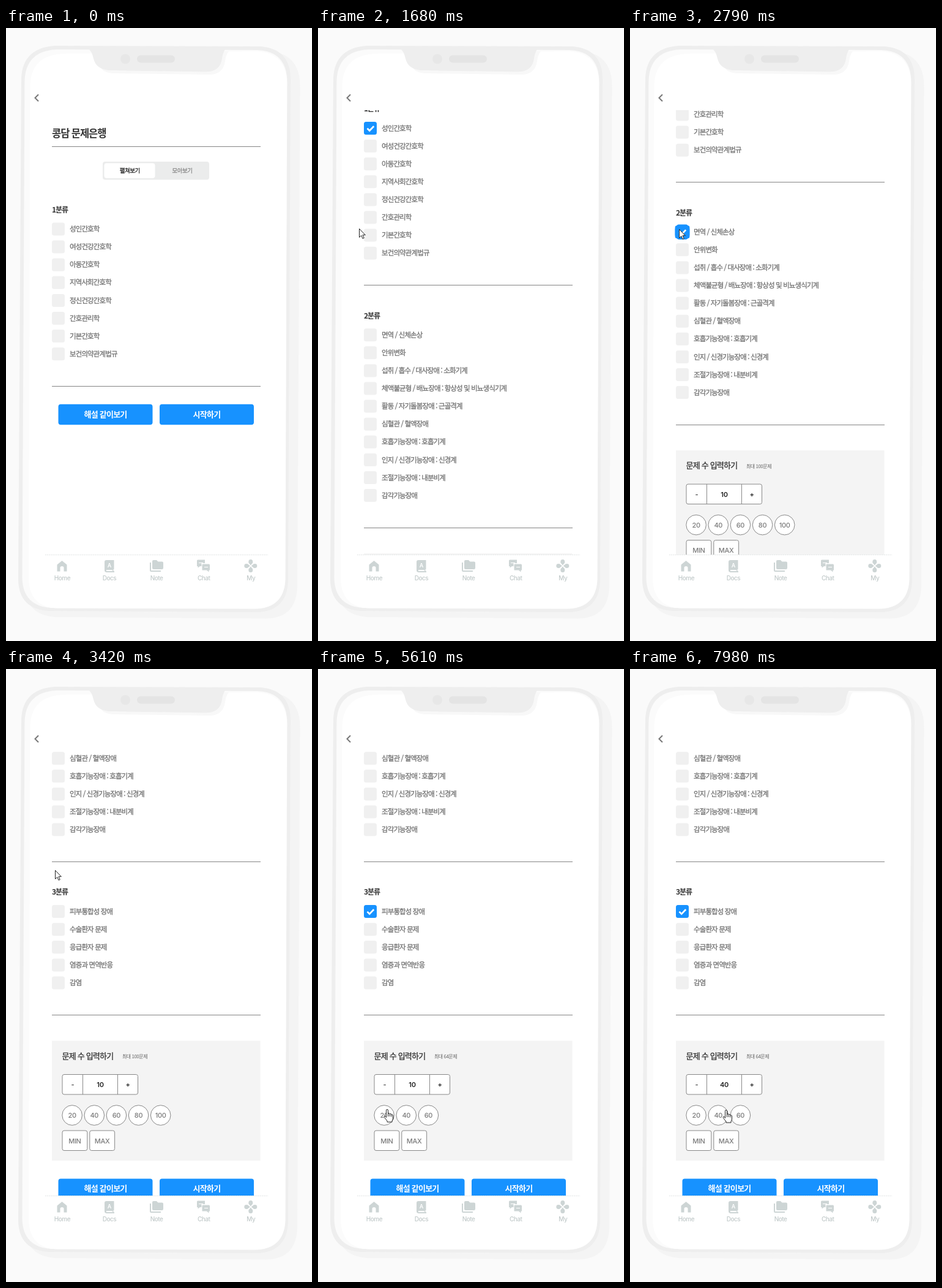
An HTML page for the animation above (8 s loop, 500 px wide and 1000 px high).

```html
<!DOCTYPE html>
<html lang="ko">
<head>
<meta charset="utf-8">
<style>
html, body { margin: 0; width: 100%; height: 100%; overflow: hidden; background: #fafafa; }
svg { display: block; width: 100vw; height: 100vh; }
text { font-family: "Noto Sans CJK KR", "Noto Sans CJK", "Noto Sans KR", sans-serif; }
.num { font-family: Inter, "Noto Sans CJK KR", sans-serif; }
</style>
</head>
<body>
<svg id="stage" viewBox="0 0 500 1000" xmlns="http://www.w3.org/2000/svg">
  <defs><clipPath id="view"><rect x="38" y="134" width="420" height="725"/></clipPath></defs>
  <rect width="500" height="1000" fill="#fafafa"/>
  <path fill="#f4f4f4" d="M90 37H425Q481 40 480.500 96L476 912Q474 963 424 963.500L84 961Q36 960 30 915L40 90Z"/>
  <path fill="#eee" d="M79 29L414 30Q465 33 465 84L461 902Q459 952 409 953L70 951Q21 948 20 900L25 82Q27 33 79 29Z"/>
  <path fill="#fbfbfb" d="M82 35L411 36Q459 38 459.500 88L456 900Q454 946 406 947L74 946Q28 943 26.500 898L30.500 86Q32 38 82 35Z"/>
  <path fill="#fff" d="M90 42L409 38Q458 40 459 90L456.500 900Q454 947 406 947.500L82 946.500Q38 944 37 898L39.500 92Q42 46 90 42Z"/>
  <path fill="#f8f8f8" d="M150 38H364Q359 44 358 54Q355 76 332 76L174 74Q154 72 150 56Z"/>
  <path fill="#eee" d="M136 35H358Q354 41 353 50Q350 71 327 71.500L168 69Q147 67 143 50Q141 40 136 35Z"/>
  <circle cx="195" cy="50.500" r="8" fill="#e7e7e7"/>
  <rect x="214" y="44.500" width="62" height="12" rx="6" fill="#e4e4e4"/>
  <path d="M53 108.500L47.500 114L53 119.500" fill="none" stroke="#777" stroke-width="2"/>
  <g clip-path="url(#view)"><g id="page"></g></g>
  <path d="M64 859.500H428" stroke="#e2e5e5" stroke-dasharray="2 1"/>
  <g id="nav" fill="#cdd5d5"></g>
  <g id="arrow" fill="#fff" stroke="#222" stroke-width="1" stroke-linejoin="round">
    <path d="M.5.5V14.500L3.800 11.500L6 16.500L8.200 15.500L6 10.700H10.300Z"/>
  </g>
  <g id="hand" fill="#fff" stroke="#222" stroke-width="1" stroke-linejoin="round">
    <path d="M-1.500 12.500V1.200Q-1.500-.5 0-.5Q1.500-.5 1.500 1.200V7Q1.800 5.500 3 5.700Q4.300 5.800 4.300 7.500Q4.800 6.200 6 6.500Q7 6.800 7 8.500Q7.800 7.300 8.800 8Q9.500 8.500 9.500 10V14Q9.500 16 8 18V20H0V18.200L-4.500 12.500Q-5.500 10.800-4.200 10.200Q-3 9.800-1.500 12.500ZM1.500 7V11M4.300 7.500V11M7 8.500V11.500"/>
  </g>
</svg>
<script>
const LOOP = 8000, BLUE = '#1792ff', STEP = 29.1, TICK = 166.25;
const $ = id => document.getElementById(id);
const page = $('page');

function el(parent, tag, attrs, text) {
  const n = document.createElementNS('http://www.w3.org/2000/svg', tag);
  for (const k in attrs) n.setAttribute(k, attrs[k]);
  if (text !== undefined) n.textContent = text;
  parent.appendChild(n);
  return n;
}
const rect = (p, x, y, width, height, rx, fill, stroke = 'none') =>
  el(p, 'rect', { x, y, width, height, rx, fill, stroke });
// y is the middle of the line of text
const label = (p, x, y, text, size, fill, more = {}) =>
  el(p, 'text', { x, y: y + size * 0.365, 'font-size': size, fill, ...more }, text);
const number = (p, x, y, text, fill, weight = 500) =>
  label(p, x, y, text, 11, fill, { class: 'num', 'text-anchor': 'middle', 'font-weight': weight, 'letter-spacing': -0.3 });
const rule = (p, y) => el(p, 'path', { d: `M75 ${y}H415.500`, stroke: '#858585', 'shape-rendering': 'crispEdges' });
// a hairline outline gives regular type a medium weight
const medium = color => ({ stroke: color, 'stroke-width': 0.3 });
const show = (n, on) => n.setAttribute('display', on ? 'inline' : 'none');
const move = (n, x, y) => n.setAttribute('transform', `translate(${x} ${y})`);
const clamp = x => Math.max(0, Math.min(1, x));
const easeOut = x => 1 - (1 - clamp(x)) ** 2.3;
const smooth = x => x * x * (3 - 2 * x);

// Header
label(page, 75, 172, '콩담 문제은행', 16.5, '#333', { 'font-weight': 700, 'letter-spacing': -1.05 });
rule(page, 193.5);
rect(page, 158, 218, 174, 29.5, 4, '#ebecec');
rect(page, 160.5, 220.5, 83, 24.5, 4, '#fff');
const tab = { 'text-anchor': 'middle', 'letter-spacing': -0.45 };
label(page, 202.3, 233, '펼쳐보기', 9.5, '#222', { ...tab, ...medium('#222') });
label(page, 288, 233, '모아보기', 9.5, '#888', { ...tab, ...medium('#888') });

// Groups of check boxes; only the first box of each gets ticked
function group(top, name, items, clickAt) {
  const g = el(page, 'g', {});
  label(g, 75, top, name, 12, '#333', { 'font-weight': 700, 'letter-spacing': -1 });
  const cy = top + 31.5;
  items.forEach((s, i) => {
    const y = cy + i * STEP;
    rect(g, 75, y - 10.5, 21, 21, 3.5, '#f0f0f0');
    label(g, 104, y, s, 11.5, '#757575', { ...medium('#757575'), 'letter-spacing': -0.88 });
  });
  const end = cy + (items.length - 1) * STEP + 52.5;
  rule(g, end);
  const tick = el(g, 'g', {});
  const dots = [[0, -18], [16, -8], [16, 8], [0, 18], [-16, 8], [-16, -8]]
    .map(dir => ({ dir, node: rect(tick, 0, 0, 21, 21, 4, BLUE) }));
  rect(tick, 75, cy - 10.5, 21, 21, 3.5, BLUE);
  el(tick, 'path', { d: `M80.500 ${cy + 0.3}l3.700 3.700 7-7.300`, fill: 'none', stroke: '#fff', 'stroke-width': 2.7 });
  return { g, end, cy, tick, dots, clickAt };
}
const g1 = group(296.5, '1분류',
  ['성인간호학', '여성건강간호학', '아동간호학', '지역사회간호학', '정신건강간호학', '간호관리학', '기본간호학', '보건의약관계법규'], 770);
const g2 = group(g1.end + 49.5, '2분류',
  ['면역 / 신체손상', '안위변화', '섭취 / 흡수 / 대사장애 : 소화기계', '체액불균형 / 배뇨장애 : 항상성 및 비뇨생식기계',
   '활동 / 자기돌봄장애 : 근골격계', '심혈관 / 혈액장애', '호흡기능장애 : 호흡기계', '인지 / 신경기능장애 : 신경계',
   '조절기능장애 : 내분비계', '감각기능장애'], 2772);
const g3 = group(g2.end + 49.5, '3분류',
  ['피부통합성 장애', '수술환자 문제', '응급환자 문제', '염증과 면역반응', '감염'], 4200);
const groups = [g1, g2, g3];

// Question count panel
const panel = el(page, 'g', {});
rect(panel, 75, 0, 340.5, 195.5, 0, '#f4f4f4');
label(panel, 91.5, 24.5, '문제 수 입력하기', 13, '#333', { ...medium('#333'), 'letter-spacing': -0.8 });
const limit = label(panel, 190, 26, '', 8, '#666', { 'letter-spacing': -0.5 });
rect(panel, 92, 55, 123.5, 32.5, 3, '#fff', '#888');
el(panel, 'path', { d: 'M125.500 55V87.500M182.500 55V87.500', stroke: '#888' });
number(panel, 109, 71.5, '-', '#333');
number(panel, 199, 71.5, '+', '#222', 600);
const count = number(panel, 154, 71.5, '', '#222', 600);
const chips = [20, 40, 60, 80, 100].map((v, i) => {
  const g = el(panel, 'g', {}), cx = 108.1 + i * 36.15;
  el(g, 'circle', { cx, cy: 121.5, r: 16.3, fill: '#fff', stroke: '#888' });
  number(g, cx, 121.5, v, '#7a7a7a');
  return { g, cx };
});
[['MIN', 92], ['MAX', 136.8]].forEach(([s, x]) => {
  rect(panel, x, 146.5, 40.8, 32.5, 3, '#fff', '#888');
  number(panel, x + 20.4, 163, s, '#7a7a7a');
});

// Action buttons
const actions = el(page, 'g', {});
[['해설 같이보기', 85.5], ['시작하기', 251]].forEach(([s, x]) => {
  rect(actions, x, 0, 154, 33.5, 4, BLUE);
  label(actions, x + 77, 16.2, s, 13, '#fff', { 'font-weight': 700, 'text-anchor': 'middle', 'letter-spacing': -0.75 });
});

// Bottom bar
const nav = $('nav');
['Home', 'Docs', 'Note', 'Chat', 'My'].forEach((s, i) =>
  label(nav, 91.9 + i * 77.1, 897.5, s, 10, '#c2caca', { class: 'num', 'text-anchor': 'middle', 'font-weight': 500, 'letter-spacing': -0.5 }));
const icon = (d, fill = '#cdd5d5') => el(nav, 'path', { d, fill });
icon('M91.500 869L99.500 875.500V886.500H94.500V880.500Q94.500 878 91.500 878T88.500 880.500V886.500H83.500V875.500Z');
icon('M164 868H176.500V883H175.500V886H177V888H164Q161 887.500 161 884.500V871Q161 868 164 868ZM164 884V886H174V884Z');
number(nav, 168.800, 876, 'A', '#fff', 600).setAttribute('font-size', 9);
icon('M241 868H246L248.500 870.500H255Q257 870.500 257 872.500V881Q257 883 255 883H241Q239 883 239 881V870Q239 868 241 868Z');
icon('M235 872H237V885H253V887H237Q235 887 235 885Z');
icon('M313.500 867.500H325V873H319.500V878H317L313.500 880.500V878H312V869Q312 867.500 313.500 867.500Z');
icon('M322 874.500H331.500Q333 874.500 333 876V884.500H331.500V887.500L328 884.500H320.500V876Q320.500 874.500 322 874.500Z');
icon('M315 872H322V873H315ZM324 879H330V880H324Z', '#fff');
for (let a = 0; a < 360; a += 90)
  el(nav, 'path', { d: 'M399.800 876.500L396.500 872.500Q395.500 867 399.800 867T403.100 872.500Z', transform: `rotate(${a} 399.800 877.500)` });

// Pointer path: time, x, y
const PATH = [[30, 41, 115], [620, 82, 323], [900, 82, 323], [1350, 67, 327], [2400, 67, 327], [2680, 80, 328],
  [3480, 80, 328], [4000, 82, 390], [4240, 82, 390], [4500, 334, 432], [4680, 293, 459.5], [4880, 289, 538],
  [5500, 113, 719], [6080, 113, 719], [6360, 172, 722], [6540, 163, 718], [6780, 136, 724], [7000, 136, 724],
  [7240, 171, 724], [7320, 171, 724], [7520, 123, 728], [7740, 140, 704], [7980, 157, 720]];
function pointer(t) {
  let i = 1;
  while (i < PATH.length - 1 && PATH[i][0] < t) i++;
  const [t0, x0, y0] = PATH[i - 1], [t1, x1, y1] = PATH[i];
  const k = smooth(clamp((t - t0) / (t1 - t0)));
  return [x0 + (x1 - x0) * k, y0 + (y1 - y0) * k];
}

const WHEEL = [1388, 1800, 2920, 3080];
const scrollAt = t => WHEEL.reduce((s, w) => s + TICK * easeOut((t - w) / 340), 0);

// Six small squares fly out of a freshly ticked box
function drawTick(b, t) {
  const age = t - b.clickAt;
  show(b.tick, age >= 0);
  const a = easeOut(age / 240), z = easeOut((age - 240) / 360);
  const size = 21 - 2 * (8 * a + 2 * z);
  for (const { dir, node } of b.dots) {
    node.setAttribute('x', 85.5 + dir[0] * (a + z) - size / 2);
    node.setAttribute('y', b.cy + dir[1] * (a + z) - size / 2);
    node.setAttribute('width', size);
    node.setAttribute('height', size);
    node.setAttribute('rx', 4 * (1 - a));
    node.setAttribute('opacity', 1 - z);
  }
}

function draw(t) {
  const second = t >= 900, third = t >= 2880, limited = t >= 4290;
  const scroll = scrollAt(t);
  move(page, 0, -scroll);
  groups.forEach(b => drawTick(b, t));
  show(g2.g, second);
  show(g3.g, third);
  show(panel, second);
  const top = (third ? g3 : g2).end + 42;
  move(panel, 0, top);
  show(actions, t < 800 || second);
  move(actions, 0, second ? top + 225 : g1.end + 29.5);
  limit.textContent = limited ? '최대 64문제' : '최대 100문제';
  count.textContent = t < 5850 ? 10 : t < 6900 ? 20 : 40;
  chips.forEach((c, i) => show(c.g, i < 3 || !limited));

  const [x, y] = pointer(t);
  const cy = top + 121.5 - scroll;
  const over = limited && chips.slice(0, 3).some(c => Math.hypot(x - c.cx, y - cy) < 16.8);
  move($('arrow'), x, y);
  move($('hand'), x, y);
  show($('arrow'), t >= 30 && !over);
  show($('hand'), t >= 30 && over);
}

const start = performance.now();
function frame() {
  draw((performance.now() - start) % LOOP);
  requestAnimationFrame(frame);
}
draw(0);
requestAnimationFrame(frame);
</script>
</body>
</html>
```
